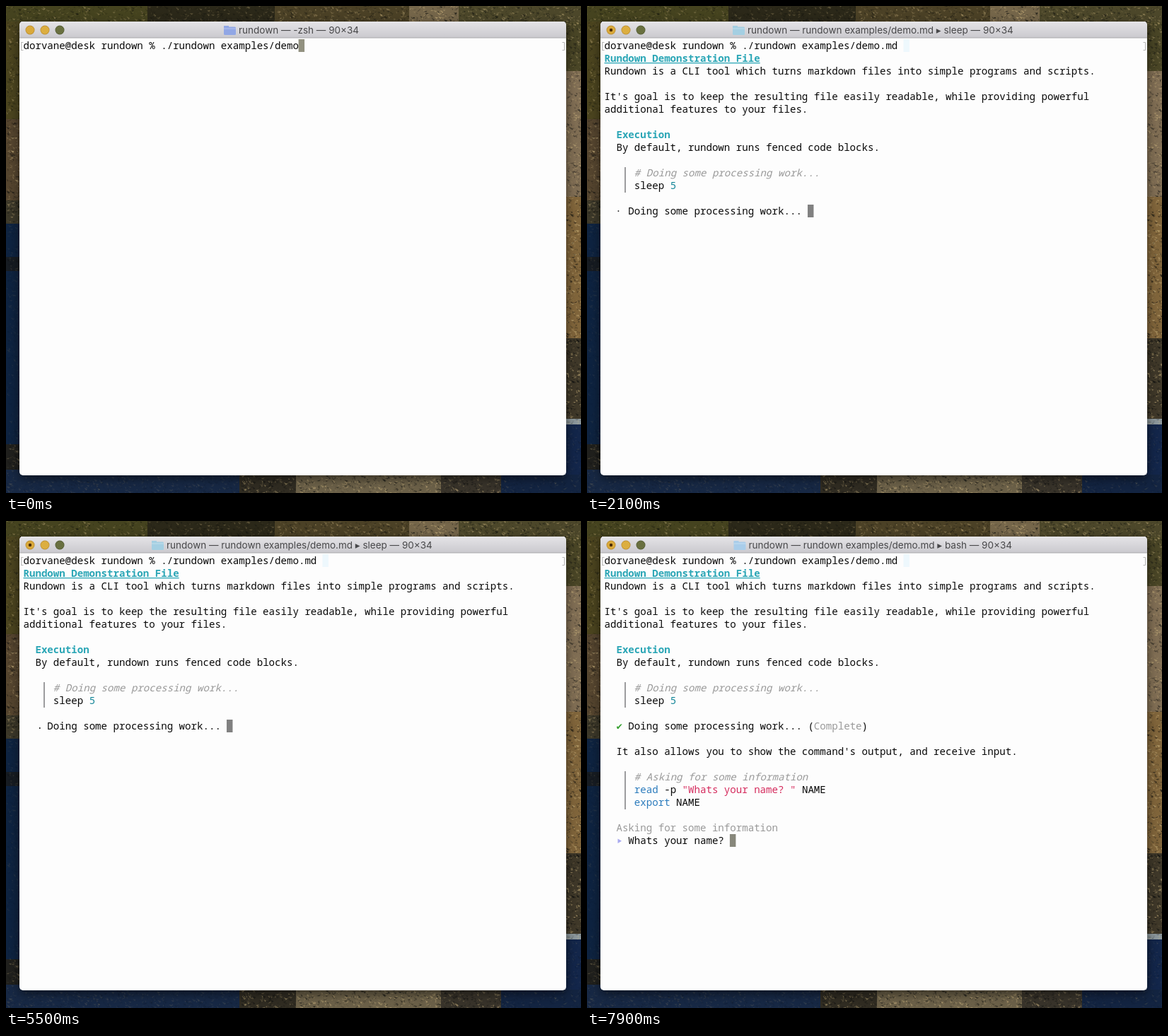
An HTML page with a canvas that plays this animation: 813 by 689 pixels, repeating every 8 s.

```html
<!DOCTYPE html>
<html lang="en">
<head>
<meta charset="utf-8">
<title>Terminal demo</title>
<style>
  html, body { margin: 0; width: 100%; height: 100%; overflow: hidden; background: #222; }
  canvas { display: block; }
</style>
</head>
<body>
<canvas id="stage" width="813" height="689"></canvas>
<script>
const W = 813, H = 689, LOOP = 8000, STEP = 100;
const CELL = 8.467, ROW = 18, LEFT = 24.5, TOP = 47;
const ENTER = 1700, DONE = 7000;
const MONO = '14.11px "Noto Sans Mono", "DejaVu Sans Mono", monospace';
const CYAN = '#2ba6b6', GREY = '#999999', BLUE = '#2c7cbd', INK = '#080808';
const SPINNER = [...'⠁⠁⠉⠙⠚⠒⠂⠂⠒⠲⠴⠤⠄⠄⠤⠠⠠⠤⠦⠖⠒⠐⠐⠒⠓⠋⠉⠈⠈'];
const PROMPT = 'dorvane@desk rundown % ./rundown examples/demo';

const stage = document.getElementById('stage').getContext('2d');
const backdrop = document.createElement('canvas');
backdrop.width = W;
backdrop.height = H;

let seed = 11;
const random = () => (seed = (seed * 16807) % 2147483647) / 2147483647;

function rect(g, x, y, w, h, color) {
  g.fillStyle = color;
  g.fillRect(x, y, w, h);
}

function disc(g, x, y, r, color) {
  g.fillStyle = color;
  g.beginPath();
  g.arc(x, y, r, 0, 7);
  g.fill();
}

// Rough ground: a base tone with small slanted light and dark chips.
function terrain(g, x, y, w, h, color, contrast) {
  g.save();
  g.beginPath();
  g.rect(x, y, w, h);
  g.clip();
  rect(g, x, y, w, h, color);
  for (let i = 0; i < w * h / 12; i++) {
    const px = x + random() * w, py = y + random() * h;
    const light = random() < 0.45;
    const size = 1 + random() * 5, slope = random() * 6 - 3;
    g.fillStyle = `rgba(${light ? '215,190,135' : '5,8,10'},${random() * contrast})`;
    g.beginPath();
    g.moveTo(px, py);
    g.lineTo(px + size, py + slope);
    g.lineTo(px + size * 0.6, py + slope + 2);
    g.fill();
  }
  g.restore();
}

function paintBackdrop() {
  const g = backdrop.getContext('2d');
  const ground = [
    [0, 0, 200, 22, '#45431f', 0.35], [200, 0, 180, 22, '#2b2819', 0.3],
    [380, 0, 190, 22, '#4b4126', 0.4], [570, 0, 70, 22, '#75664a', 0.6],
    [640, 0, 173, 22, '#4c472a', 0.45],
    [0, 22, 20, 138, '#4b441f', 0.4], [0, 160, 20, 115, '#55452f', 0.5],
    [0, 275, 20, 33, '#3c3829', 0.5], [0, 308, 20, 312, '#0e2340', 0.08],
    [0, 355, 20, 20, '#171c22', 0.15], [0, 620, 20, 36, '#20201d', 0.3],
    [791, 22, 22, 70, '#494526', 0.45], [791, 92, 22, 178, '#806e54', 0.5],
    [791, 270, 22, 200, '#80653b', 0.55], [791, 470, 22, 114, '#3f3829', 0.6],
    [791, 584, 22, 8, '#8c979b', 0.4], [791, 592, 22, 72, '#13264a', 0.12],
    [0, 656, 330, 33, '#172844', 0.14], [330, 663, 80, 26, '#302c22', 0.45],
    [410, 663, 205, 26, '#6b6048', 0.55], [615, 663, 85, 26, '#38332a', 0.45],
    [700, 663, 113, 26, '#132441', 0.12]
  ];
  for (const patch of ground) terrain(g, ...patch);

  g.shadowColor = 'rgba(0,0,0,.55)';
  g.shadowBlur = 14;
  g.shadowOffsetY = 4;
  g.fillStyle = '#fdfdfd';
  g.beginPath();
  g.roundRect(19, 22, 773, 642, 5);
  g.fill();
  g.shadowColor = 'transparent';

  const bar = g.createLinearGradient(0, 22, 0, 45);
  bar.addColorStop(0, '#e5e4e7');
  bar.addColorStop(1, '#cac9ce');
  g.fillStyle = bar;
  g.beginPath();
  g.roundRect(19, 22, 773, 23, [5, 5, 0, 0]);
  g.fill();
  rect(g, 19, 44.5, 773, 1, '#aaa9ac');

  ['#d9a93b', '#dcae40', '#697040'].forEach((color, i) => {
    disc(g, 34 + 21 * i, 34, 6.5, i < 2 ? '#b78a30' : '#535c34');
    disc(g, 34 + 21 * i, 34, 5.8, color);
  });

  g.strokeStyle = '#b5b5b5';
  for (const [x, lip] of [[21.5, 3], [789.5, -3]]) {
    g.beginPath();
    g.moveTo(x + lip, 51.5);
    g.lineTo(x, 51.5);
    g.lineTo(x, 62.5);
    g.lineTo(x + lip, 62.5);
    g.stroke();
  }
}

const colX = col => LEFT + col * CELL;

function put(row, col, text, color = INK, style = '500') {
  stage.font = `${style} ${MONO}`;
  stage.fillStyle = color;
  stage.fillText(text, colX(col), TOP + 14 + row * ROW);
}

function cursor(row, col, color, alpha = 1) {
  stage.globalAlpha = alpha;
  rect(stage, colX(col) - 0.4, TOP + row * ROW, CELL, ROW, color);
  stage.globalAlpha = 1;
}

function title(x, text, folder) {
  rect(stage, x - 21, 28, 7, 4, folder);
  stage.fillStyle = folder;
  stage.beginPath();
  stage.roundRect(x - 21, 29.5, 17, 11.5, 1.5);
  stage.fill();
  rect(stage, x - 21, 31.5, 17, 1, 'rgba(255,255,255,.35)');
  stage.font = '13.5px Inter, "DejaVu Sans", sans-serif';
  stage.fillStyle = '#48484a';
  stage.fillText(text, x, 39);
}

function codeBar(row, rows) {
  rect(stage, 53, TOP + 1 + row * ROW, 2, rows * ROW, '#9c9c9e');
}

// Braille dots 1-6 run down the left column, then the right one.
function spinner(t) {
  const glyph = SPINNER[Math.floor(Math.max(0, t - 1707) / 51) % SPINNER.length];
  const bits = glyph.charCodeAt(0) - 0x2800;
  for (let i = 0; i < 6; i++) {
    if (bits >> i & 1) disc(stage, i < 3 ? 44.4 : 47.8, 287.2 + (i % 3) * 2.9, 0.95, INK);
  }
}

const ramp = (t, from, to) => Math.min(1, Math.max(0, (t - from) / (to - from)));
const blink = (t, out) => 1 - ramp(t, out, out + 300) + ramp(t, out + 300, out + 600);

function document_(t) {
  put(1, 0, 'Rundown Demonstration File', CYAN, 'bold');
  rect(stage, LEFT, 80, 26 * CELL, 1.3, CYAN);
  put(2, 0, 'Rundown is a CLI tool which turns markdown files into simple programs and scripts.');
  put(4, 0, "It's goal is to keep the resulting file easily readable, while providing powerful");
  put(5, 0, 'additional features to your files.');
  put(7, 2, 'Execution', CYAN, 'bold');
  put(8, 2, 'By default, rundown runs fenced code blocks.');
  codeBar(10, 2);
  put(10, 5, '# Doing some processing work...', GREY, 'italic');
  put(11, 5, 'sleep');
  put(11, 11, '5', '#168799');
  put(13, 4, 'Doing some processing work...');
  if (t < DONE) {
    spinner(t);
    cursor(13, 34, '#818181');
  }
}

function question(t) {
  put(13, 2, '✔', '#36a02f');
  put(13, 34, '(');
  put(13, 35, 'Complete', GREY);
  put(13, 43, ')');
  put(15, 2, "It also allows you to show the command's output, and receive input.");
  codeBar(17, 3);
  put(17, 5, '# Asking for some information', GREY, 'italic');
  put(18, 5, 'read', BLUE);
  put(18, 10, '-p');
  put(18, 13, '"Whats your name? "', '#d52b5d');
  put(18, 33, 'NAME');
  put(19, 5, 'export', BLUE);
  put(19, 12, 'NAME');
  put(21, 2, 'Asking for some information', GREY);
  stage.fillStyle = '#a9aaf0';
  stage.beginPath();
  stage.moveTo(43.5, 449.5);
  stage.lineTo(49, 452.8);
  stage.lineTo(43.5, 456);
  stage.fill();
  put(22, 4, 'Whats your name?');
  cursor(22, 21, '#87877b', blink(t, 7300));
}

function draw(t) {
  stage.drawImage(backdrop, 0, 0);
  const completed = t >= 1200;
  put(0, 0, PROMPT + (completed ? '.md' : ''));

  if (t < 1900) title(329, 'rundown — -zsh — 90×34', '#91a7e5');
  else if (t < DONE + 100) title(227, 'rundown — rundown examples/demo.md ▸ sleep — 90×34', '#a4cfe2');
  else title(228.5, 'rundown — rundown examples/demo.md ▸ bash — 90×34', '#a9cdea');

  if (t < ENTER) {
    if (completed) cursor(0, 50, '#818181');
    else cursor(0, 46, '#929180', t < 800 ? blink(t, 0) : 1 - ramp(t, 800, 1100));
    return;
  }
  cursor(0, 50, '#eef8fd');
  disc(stage, 34, 34, 2.2, '#4a2c0a');
  document_(t);
  if (t >= DONE) question(t);
}

paintBackdrop();
const start = performance.now();
function tick() {
  const t = (performance.now() - start) % LOOP;
  draw(Math.floor(t / STEP) * STEP);
  requestAnimationFrame(tick);
}
tick();
</script>
</body>
</html>
```
